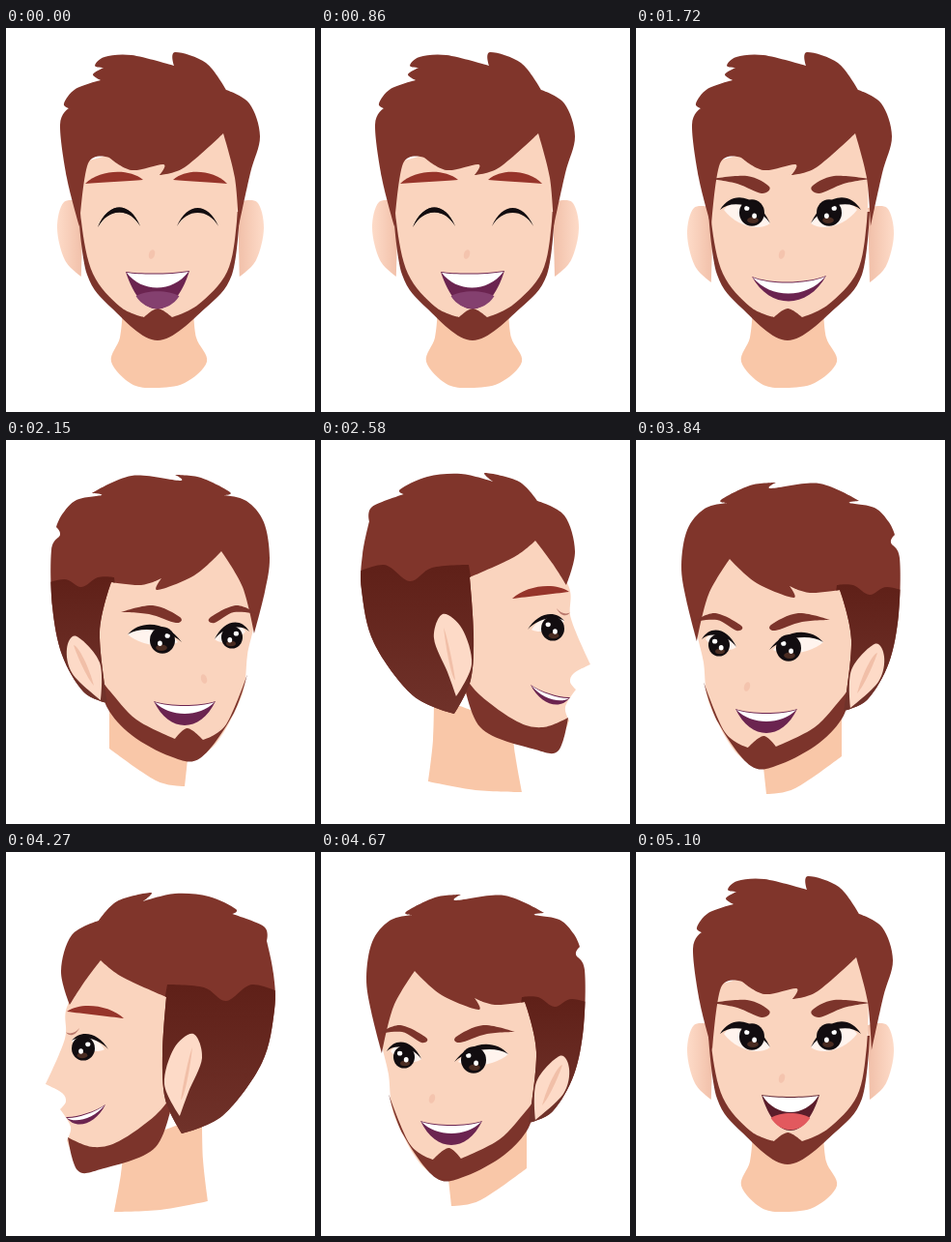
An HTML page with a canvas that plays this animation: 320 by 397 pixels, repeating every 5530 ms.

```html
<!DOCTYPE html>
<html lang="en">
<head>
<meta charset="utf-8">
<title>Turning head</title>
<style>
html, body { margin: 0; width: 100%; height: 100%; overflow: hidden; background: #fff; }
canvas { display: block; width: 320px; height: 397px; }
</style>
</head>
<body>
<canvas id="stage" width="320" height="397"></canvas>
<script>
const ctx = document.getElementById('stage').getContext('2d');
const HAIR = '#80352b', DARK = '#5f2018', BEARD = '#7c342b', BROW = '#96342a', SKIN = '#fad4be',
  NECK = '#f9c7a8', EAR = '#fddac7', INNER = '#f1bfa8', BLACK = '#120d10', PLUM = '#6b2450', WHITE = '#fff';

// Smooth closed outline through "x,y" points; "!" marks a corner.
// The optional callback paints clipped to the outline.
function blob(text, fill, inside) {
  const pts = text.split(' ').map(s => {
    const [x, y] = s.split(',').map(parseFloat);
    return { x, y, bend: s.endsWith('!') ? 0 : 1 / 6 };
  });
  const at = i => pts[(i + pts.length) % pts.length];
  const handle = (i, side) => {
    const p = at(i), k = p.bend * side;
    return [p.x + (at(i + 1).x - at(i - 1).x) * k, p.y + (at(i + 1).y - at(i - 1).y) * k];
  };
  ctx.beginPath();
  ctx.moveTo(pts[0].x, pts[0].y);
  pts.forEach((p, i) => ctx.bezierCurveTo(...handle(i, 1), ...handle(i + 1, -1), at(i + 1).x, at(i + 1).y));
  ctx.fillStyle = fill;
  ctx.fill();
  if (!inside) return;
  ctx.save();
  ctx.clip();
  inside();
  ctx.restore();
}

// Area between two arcs with shared ends; top and bottom are their sags
function crescent(x0, y0, x1, y1, top, bottom, fill) {
  const dx = (x1 - x0) * 0.25, dy = (y1 - y0) * 0.25, t = top * 4 / 3, b = bottom * 4 / 3;
  ctx.beginPath();
  ctx.moveTo(x0, y0);
  ctx.bezierCurveTo(x0 + dx, y0 + dy + t, x1 - dx, y1 - dy + t, x1, y1);
  ctx.bezierCurveTo(x1 - dx, y1 - dy + b, x0 + dx, y0 + dy + b, x0, y0);
  ctx.fillStyle = fill;
  ctx.fill();
}

function oval(x, y, rx, ry, fill, turn = 0) {
  ctx.beginPath();
  ctx.ellipse(x, y, rx, ry, turn, 0, Math.PI * 2);
  ctx.fillStyle = fill;
  ctx.fill();
}

function fade(x0, y0, x1, y1, from, to) {
  const g = ctx.createLinearGradient(x0, y0, x1, y1);
  g.addColorStop(0, from);
  g.addColorStop(1, to);
  return g;
}

function placed(dx, dy, flip, draw) {
  ctx.save();
  ctx.translate(flip ? 320 + dx : dx, dy);
  if (flip) ctx.scale(-1, 1);
  draw();
  ctx.restore();
}

function pair(draw) {
  draw();
  placed(0, 0, true, draw);
}

// Lid from tip to tip with height h over an iris at cx, cy
function eye(x0, y0, x1, y1, h, cx, cy, r) {
  crescent(x0 + 4, y0, x1, y1, -h * 0.8, h * 0.5, '#fff4ee');
  oval(cx, cy, r, r * 1.05, BLACK);
  oval(cx + 1, cy + r * 0.6, r * 0.45, r * 0.25, '#4a2c22');
  oval(cx - r * 0.4, cy - r * 0.35, 2.6, 2.4, WHITE);
  oval(cx + r * 0.2, cy + r * 0.25, 2.4, 2.8, WHITE);
  crescent(x0, y0, x1, y1, -h, -h * 0.6, BLACK);
}

function mouth(x0, y0, x1, y1, dip, teeth, depth, fill, tongue) {
  crescent(x0, y0, x1, y1, dip, depth, fill);
  const mid = (x0 + x1) / 2, reach = (x1 - x0) * 0.34, y = y0 + depth * 0.65;
  if (tongue) crescent(mid - reach, y, mid + reach, y, -5, depth * 0.33, tongue);
  crescent(x0 + 1, y0 + 1, x1 - 1, y1 + 1, dip, teeth, WHITE);
}

function frontHead(hairDx, earDy) {
  blob('121,290! 118,320 109,345 130,368 155,372 185,367 208,345 197,320 194,290!', NECK);
  placed(0, earDy, false, () => pair(() =>
    blob('80,180! 60,180 53,207 61,240 78,257!', fade(54, 0, 80, 0, EAR, INNER))));
  blob('75,190! 84,255 110,290 157,323 206,290 234,255 242,190!', BEARD);
  blob('76,140! 78,200 90,254 118,288 143,299! 157,290 172,299! 199,286 229,252 239,200 241,140! 226,105! 150,120', SKIN);
  oval(151, 234, 3, 5, '#f4c4ae', 0.3);
  placed(hairDx, 0, false, () => blob(
    '56,100 65,83! 60,78 72,63 98,54! 90,48 101,41! 92,39 102,30 130,28 174,39! 175,25 207,36 228,64! 252,78 263,112 253,150 241,205! 237,155 225,109! 185,144 159,152! 163,141 130,147 107,134! 85,140 76,205! 63,155',
    HAIR));
}

function openEyes() {
  placed(0, 0, false, () => pair(() => {
    eye(87, 188, 139, 202, 19, 120, 191, 13);
    blob('78,156! 115,153 138,164 130,171 105,161', BEARD);
  }));
}

function laugh() {
  frontHead(0, 0);
  for (const dx of [0, 81]) crescent(95, 206, 139, 205, -20, -15, BLACK);
  crescent(82, 161, 142, 157, -10, 0, BROW);
  crescent(173, 157, 229, 161, -10, 0, BROW);
  placed(81, 0, false, () => crescent(96, 205, 139, 205, -19, -14, BLACK));
  mouth(124, 252, 190, 251, 2, 16, 39, PLUM, '#84406f');
}

function smile() {
  frontHead(2, 6);
  openEyes();
  mouth(120, 257, 197, 256, 6, 17, 26, PLUM);
}

function grin() {
  frontHead(3, -1);
  openEyes();
  mouth(130, 251, 190, 251, 2, 17, 37, '#5b1d2b', '#e2595e');
}

function profile() {
  blob('117,265! 116,310 111,353! 160,362 208,364! 201,325 198,295!', NECK);
  blob('150,130! 222,100 256,150 259,185 279,232! 262,241 258,250 264,258! 253,276 257,290! 230,315 146,260!', SKIN);
  blob('146,240! 165,264 203,291 230,297 256,287! 246,321 222,320 165,297', BEARD);
  blob('43,118 50,84! 53,69 86,56! 82,51 110,38 145,35 178,43! 170,34 205,43 224,63! 252,78 263,115 254,150! 240,128 222,104! 200,121 154,142! 158,200 155,248 138,283! 95,264 55,210 42,155',
    HAIR, () => blob('30,140! 65,129 92,146 115,132 153,129! 165,200! 160,290! 30,290!', fade(0, 130, 0, 285, DARK, '#70322a')));
  blob('117,205 126,180 146,195 156,232 140,265! 131,240', EAR);
  crescent(127, 194, 139, 248, -5, 10, INNER);
  crescent(198, 164, 257, 157, -9, 0, BROW);
  crescent(244, 174, 258, 178, 3, 5, '#b9786c');
  eye(214, 196, 252, 187, 11, 240, 195, 12);
  mouth(217, 253, 258, 266, 3, 7, 13, PLUM);
}

function quarter() {
  blob('130,320! 135,366! 165,360 213,327! 213,280!', NECK);
  blob('97,118! 64,180 70,230 78,278 119,334 190,310 217,265 224,207 211,150', SKIN);
  blob('70,250! 85,292 119,337 150,335 190,313 215,285 222,255! 212,268 185,297 145,317! 132,306 116,318! 92,302', BEARD);
  blob('47,130 53,93 71,71 95,65! 88,62 118,47 145,44! 140,50 190,45 231,63! 221,65 247,70 262,85 268,98! 264,106 273,122 272,180 262,230 240,268 215,280! 223,207 211,155! 180,158 159,151! 163,163 125,148 97,123! 75,160 63,208! 52,165',
    HAIR, () => blob('208,150! 225,150 242,160 260,152 290,160! 280,290! 190,290!', fade(0, 150, 0, 270, DARK, '#70322a')));
  blob('223,238 247,211 257,224 251,250 222,277!', EAR);
  crescent(250, 220, 229, 262, 4, -7, INNER);
  oval(115, 255, 3, 5, '#f4c4ae', 0.3);
  blob('59,188! 82,179 109,192 104,197 84,186', BEARD);
  blob('201,186! 168,179 140,191 144,197 172,188', BEARD);
  eye(68, 206, 104, 214, 13, 86, 212, 11);
  eye(138, 217, 194, 209, 14, 158, 215, 13);
  mouth(103, 278, 167, 278, 4, 12, 25, PLUM);
}

const rightQuarter = () => placed(0, -8, true, quarter);
const leftProfile = () => placed(0, 8, true, profile);

// [end time in ms, pose]
const poses = [
  [430, laugh], [860, grin], [1290, laugh], [1720, grin], [2150, smile],
  [2580, rightQuarter], [2980, profile], [3410, rightQuarter], [3840, grin],
  [4270, quarter], [4670, leftProfile], [5100, quarter], [5530, grin]
];

function render() {
  const t = performance.now() % 5530;
  ctx.fillStyle = WHITE;
  ctx.fillRect(0, 0, 320, 397);
  poses.find(([end]) => t < end)[1]();
  requestAnimationFrame(render);
}
render();
</script>
</body>
</html>
```
